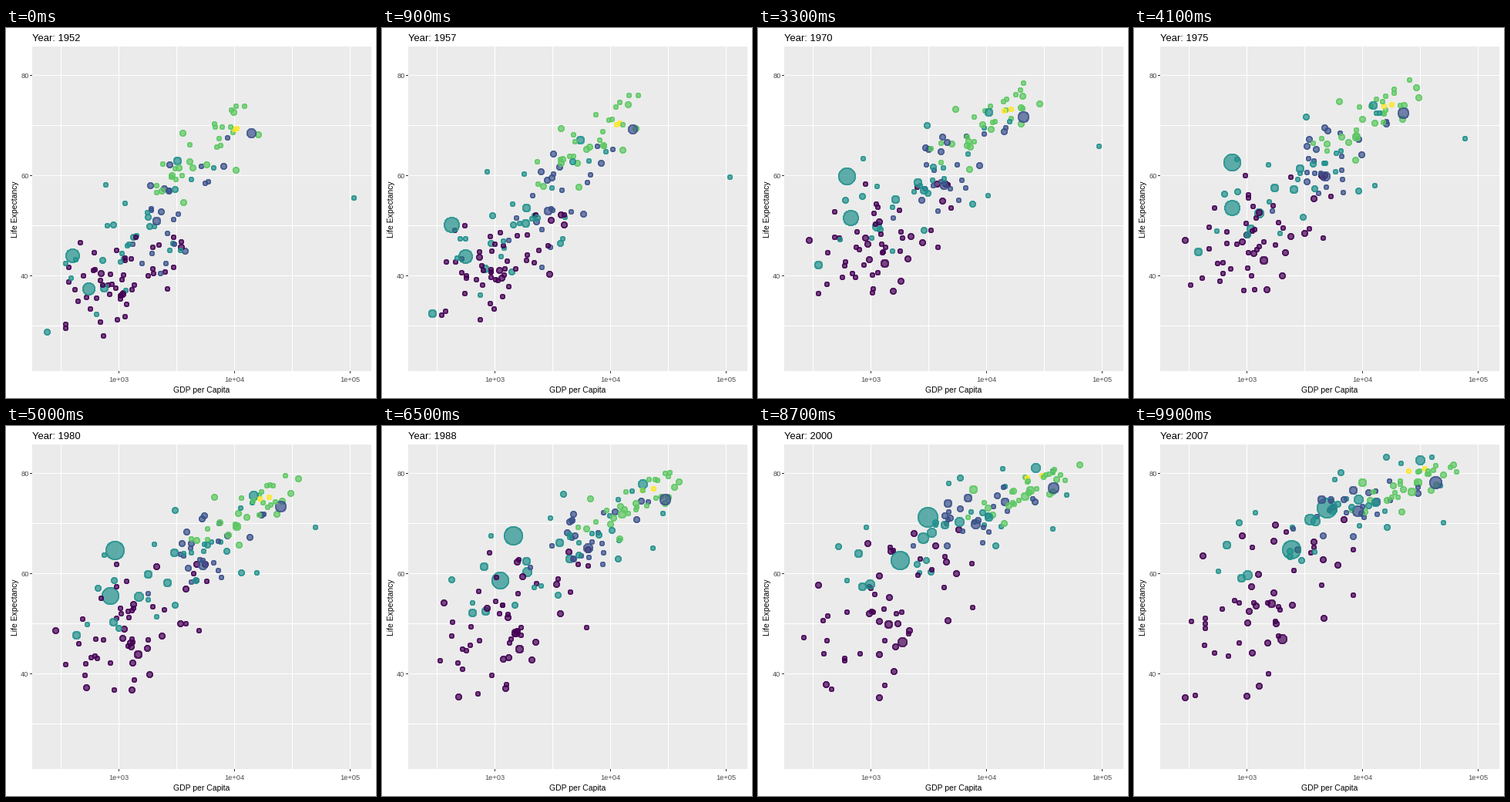
Recreate the animation shown at these times as a matplotlib script. Size 480 by 480 pixels, loop 10000 ms.

```python
import matplotlib.pyplot as plt
import numpy as np
from matplotlib.animation import FuncAnimation
from matplotlib.colors import to_rgba

SIZE, FRAMES = 480, 100
POSES = 12  # one every five years
U = np.linspace(0, 1, POSES)
YEAR = 1952 + 55 * U
AFRICA, AMERICAS, ASIA, EUROPE, OCEANIA = (
    "#440154", "#3B528B", "#21908C", "#5DC863", "#FDE725")

rng = np.random.default_rng(7)
colors, lives, gdps, pops = [], [], [], []


def rise(start, end, bend=1):
    """Early growth for bend < 1, late growth for bend > 1."""
    return start + (end - start) * U ** bend


def log_rise(start, end, bend=1):
    return rise(np.log10(start), np.log10(end), bend)


def dip(depth, year, width):
    return depth * np.exp(-((YEAR - year) / width) ** 2)


def add(color, life, gdp, pop):
    """One country: years, log10 of dollars, millions of people."""
    colors.append(to_rgba(color, 0.7))
    lives.append(life)
    gdps.append(gdp)
    pops.append(pop)


def walk(n):
    """Slowly drifting standard scores, one row per country."""
    steps = rng.normal(size=(n, POSES))
    steps[:, 0] *= 4
    w = steps.cumsum(axis=1)
    return (w - w.mean(axis=0)) / w.std(axis=0)


def crowd(color, n, life, life_sd, gdp, gdp_sd, rho, pop, growth):
    """Countries scattered around the trend of their continent."""
    wealth = walk(n)
    health = rho * wealth + np.sqrt(1 - rho ** 2) * walk(n)
    ys = rise(*life) + rise(*life_sd) * health.clip(-2.2, 1.75)
    xs = log_rise(*gdp) + rise(*gdp_sd) * wealth.clip(-2, 2)
    sizes = pop * np.exp(rng.normal(0, 1.1, n).clip(-2, 1.9))
    for x, y, p in zip(xs, ys, sizes):
        add(color, y, x, rise(p, p * growth))


crowd(AFRICA, 50, life=(39, 54.5, 0.6), life_sd=(5, 9.3),
      gdp=(1000, 1450, 0.6), gdp_sd=(0.27, 0.38), rho=0.5, pop=2.6, growth=3.6)
crowd(AMERICAS, 23, life=(53, 73.5, 0.8), life_sd=(8.3, 3.8),
      gdp=(3000, 8700, 0.75), gdp_sd=(0.23, 0.27), rho=0.72, pop=3.5, growth=2.5)
crowd(ASIA, 28, life=(47, 71, 0.8), life_sd=(8.3, 7),
      gdp=(1250, 5000, 0.7), gdp_sd=(0.36, 0.52), rho=0.72, pop=6, growth=3)
crowd(EUROPE, 30, life=(64.7, 77.7, 0.7), life_sd=(5.3, 2.7),
      gdp=(5200, 25500, 0.75), gdp_sd=(0.25, 0.25), rho=0.78, pop=8, growth=1.3)
crowd(OCEANIA, 2, life=(69.3, 80.7), life_sd=(0.2, 0.6),
      gdp=(10300, 29400, 0.9), gdp_sd=(0.01, 0.07), rho=0.9, pop=4, growth=2)

# The largest dots, and those that leave the crowd
add(ASIA, rise(44, 73, 0.5) - dip(12, 1962, 4),
    log_rise(400, 4959, 1.6), rise(556, 1319))
add(ASIA, rise(37.4, 64.7, 0.6), log_rise(547, 2452, 1.8), rise(372, 1110))
add(ASIA, rise(37.5, 70.7, 0.9), log_rise(750, 3541, 1.2), rise(82, 224))
add(ASIA, rise(63, 82.6, 0.65), log_rise(3217, 31656, 0.6), rise(86, 127))
add(ASIA, rise(55.6, 77.6, 0.7),
    log_rise(108382, 47307, 2) - dip(0.45, 1987, 9), rise(0.2, 2.5))
add(AMERICAS, rise(68.4, 78.2), log_rise(13990, 42952, 0.95), rise(158, 301))
add(AMERICAS, rise(50.9, 72.4), log_rise(2109, 9066, 0.65), rise(57, 190))
add(AFRICA, rise(36.3, 46.9, 0.5), log_rise(1077, 2014), rise(33, 135))
add(AFRICA, rise(40, 46.2) - dip(21, 1992, 4),
    log_rise(493, 863), rise(2.5, 8.9))

order = rng.permutation(len(colors))
colors = np.array(colors)[order]
xs = 146 + 150 * (np.array(gdps)[order] - 3)
ys = 321 - 6.5 * (np.array(lives)[order] - 40)
pops = np.array(pops)[order]

plt.rcParams["font.family"] = "Liberation Sans"
fig = plt.figure(figsize=(SIZE / 72, SIZE / 72), dpi=72, facecolor="white")
ax = fig.add_axes([0, 0, 1, 1])
ax.set(xlim=(0, SIZE), ylim=(SIZE, 0))
ax.axis("off")

LEFT, RIGHT, TOP, BOTTOM = 34, 474, 24, 445


def box(x, y, w, h, color):
    ax.add_patch(plt.Rectangle((x, y), w, h, fc=color, lw=0,
                               antialiased=False, snap=False, zorder=1))


box(LEFT, TOP, RIGHT - LEFT, BOTTOM - TOP, "#EBEBEB")
for x in range(71, 450, 75):
    box(x, TOP, 1, BOTTOM - TOP, "white")
for y in range(61, 400, 65):
    box(LEFT, y, RIGHT - LEFT, 1, "white")
for i in range(3):
    x, y = 146 + 150 * i, 61 + 130 * i
    box(x, BOTTOM, 1, 3, "#333333")
    box(LEFT - 3, y, 3, 1, "#333333")
    ax.text(x, 459, f"1e+0{i + 3}", size=9.3, color="#4D4D4D", ha="center")
    ax.text(29.5, y + 4, 80 - 20 * i, size=9.3, color="#4D4D4D", ha="right")

ax.text(254, 473, "GDP per Capita", size=10.4, ha="center")
ax.text(15, 235, "Life Expectancy", size=10.4, rotation=90,
        ha="center", rotation_mode="anchor")
title = ax.text(LEFT, 17, "", size=13)
dots = ax.scatter(xs[:, 0], ys[:, 0], facecolors=colors, edgecolors=colors,
                  linewidths=1, antialiased=False, snap=False, zorder=2)


def draw(i):
    t = i / (FRAMES - 1)
    k, part = divmod(i * (POSES - 1), FRAMES - 1)
    part /= FRAMES - 1
    nxt = min(k + 1, POSES - 1)
    x, y, pop = (v[:, k] + (v[:, nxt] - v[:, k]) * part for v in (xs, ys, pops))
    scale = 2 + 10 * np.sqrt(pop / 1319)
    radius = np.round(0.375 * (2.845 * scale + 0.945)) - 0.3
    dots.set_offsets(np.column_stack([np.round(x), np.round(y)]) + 0.5)
    dots.set_sizes((2 * radius) ** 2)
    title.set_text(f"Year: {1952 + 55 * t:.0f}")
    return dots, title


anim = FuncAnimation(fig, draw, frames=FRAMES, interval=100,
                     repeat=True, repeat_delay=0)
plt.show()
```
